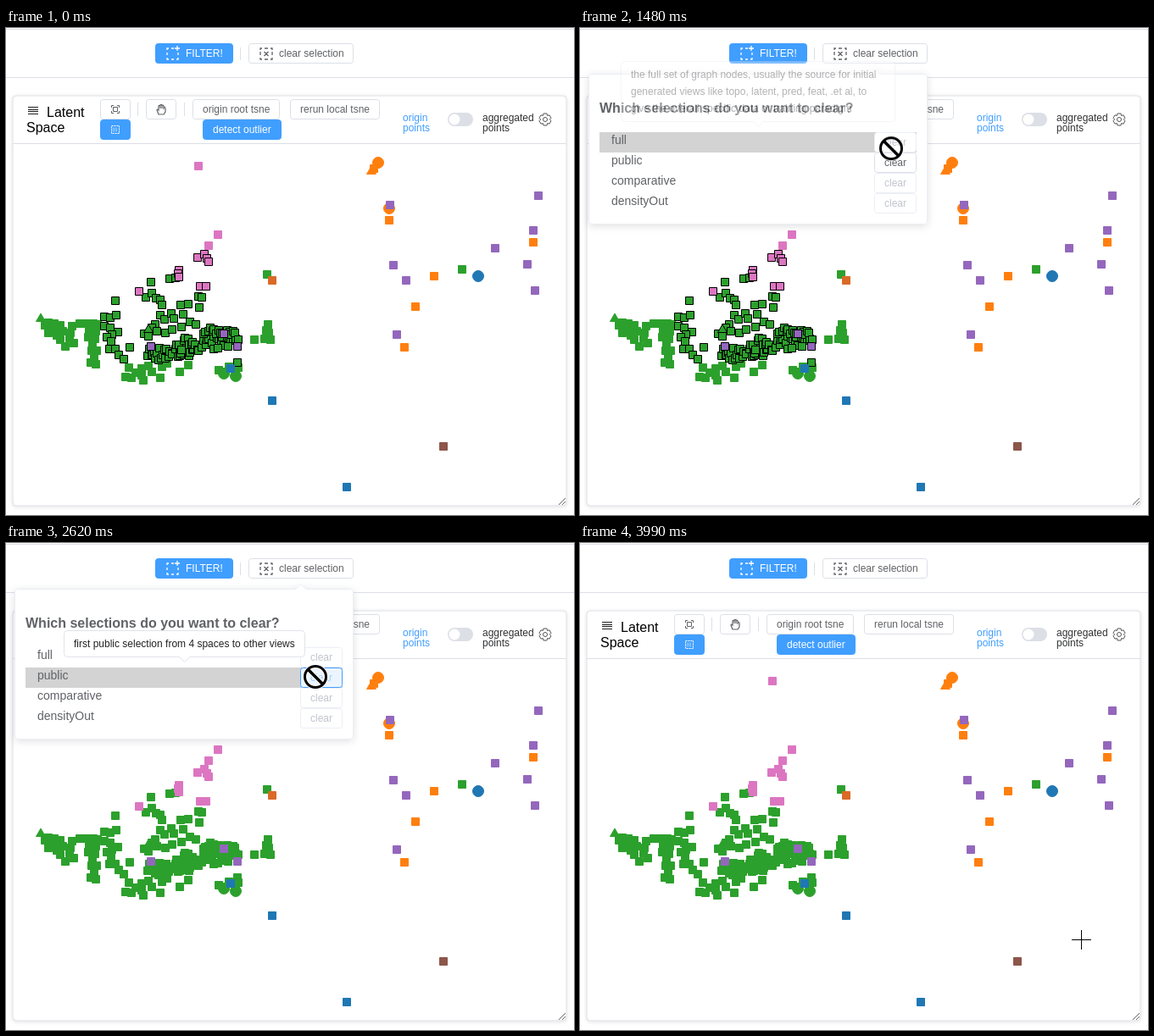
Animation, 670 px wide and 575 px high, one loop 4060 ms. Source, as an HTML page:

```html
<!DOCTYPE html>
<html lang="en">
<head>
<meta charset="utf-8">
<title>Latent space selections</title>
<style>
html, body { margin: 0; width: 100%; height: 100%; overflow: hidden; background: #fff; }
svg { display: block; width: 670px; height: 575px; font: 12px "Liberation Sans", Arial, sans-serif; }
text { fill: currentColor; white-space: pre; }
.line { stroke: #dcdfe6; fill: none; }
.icon { fill: none; stroke: currentColor; }
.btn { color: #606266; }
.btn rect { fill: #fff; stroke: #dcdfe6; }
.primary { color: #fff; }
.primary rect { fill: #409eff; stroke: #409eff; }
.off { color: #c0c4cc; }
.off rect { stroke: #ebeef5; }
.marks * { fill: currentColor; stroke: currentColor; }
.row { fill: #d3d3d3; opacity: 0; }
.tip { color: #222; opacity: 0; }
.tip path { fill: #fff; stroke: #e0e3e9; }

.marks .picked, .step, .row, #clear, #clear rect, #public, #public rect { animation: 4060ms step-end infinite; }
.fade, #mouse { animation: 4060ms linear infinite; }

.marks .picked { animation-name: picked; }
@keyframes picked { 0% { stroke: #000 } 63%, 100% { stroke: currentColor } }

#dialog { animation-name: dialog; }
@keyframes dialog { 0%, 14.3% { opacity: 0 } 19.5%, 84% { opacity: 1 } 89%, 100% { opacity: 0 } }

#clear { animation-name: clearText; }
#clear rect { animation-name: clearBox; }
@keyframes clearText { 0%, 28.3%, 100% { color: #606266 } 14.5% { color: #409eff } }
@keyframes clearBox {
  0%, 28.3%, 100% { fill: #fff; stroke: #dcdfe6 }
  14.5% { fill: #ecf5ff; stroke: #c6e2ff }
}

#public { animation-name: publicText; }
#public rect { animation-name: publicBox; }
@keyframes publicText {
  0% { color: #606266 } 39.2% { color: #409eff } 63% { color: #a0cfff } 67%, 100% { color: #c0c4cc }
}
@keyframes publicBox {
  0% { fill: #fff; stroke: #dcdfe6 }
  39.2% { fill: #ecf5ff; stroke: #c6e2ff }
  63% { fill: #ecf5ff; stroke: #409eff }
  67%, 100% { fill: #fff; stroke: #ebeef5 }
}

#row0 { animation-name: row0; }
#row1 { animation-name: row1; }
#row2 { animation-name: row2; }
#row3 { animation-name: row3; }
@keyframes row0 { 0%, 39.2%, 100% { opacity: 0 } 34.7% { opacity: 1 } }
@keyframes row1 { 0%, 68.8%, 100% { opacity: 0 } 39.2% { opacity: 1 } }
@keyframes row2 { 0%, 71.4%, 100% { opacity: 0 } 68.8% { opacity: 1 } }
@keyframes row3 { 0%, 75.9%, 100% { opacity: 0 } 71.4% { opacity: 1 } }

#tip0 { animation-name: tip0; }
#tip1 { animation-name: tip1; }
#tip2 { animation-name: tip2; }
#tip3 { animation-name: tip3; }
@keyframes tip0 { 0%, 34.9% { opacity: 0 } 39.5%, 41% { opacity: 1 } 46%, 100% { opacity: 0 } }
@keyframes tip1 { 0%, 44.8% { opacity: 0 } 49.8%, 68.5% { opacity: 1 } 73%, 100% { opacity: 0 } }
@keyframes tip2 { 0%, 71.2% { opacity: 0 } 76%, 78.6% { opacity: 1 } 83.3%, 100% { opacity: 0 } }
@keyframes tip3 { 0%, 74% { opacity: 0 } 78.6%, 80% { opacity: 1 } 84.5%, 100% { opacity: 0 } }

#mouse { animation-name: mouse; }
@keyframes mouse {
  0%, 1.72% { transform: translate(616px, 549px); animation-timing-function: ease-in-out }
  13.05% { transform: translate(346px, 43px) }
  14.78%, 27% { transform: translate(347px, 29px) }
  36.45% { transform: translate(367px, 142px) }
  39.9%, 66.3% { transform: translate(365px, 158px) }
  69.5% { transform: translate(368px, 180px) }
  72.7% { transform: translate(388px, 206px) }
  74.4% { transform: translate(418px, 232px) }
  81.28% { transform: translate(456px, 322px) }
  87.93% { transform: translate(554px, 323px) }
  98.28%, 100% { transform: translate(591px, 468px) }
}
#cross { animation-name: cross; }
#hand { animation-name: hand; }
#ban { animation-name: ban; }
#arrow { animation-name: arrow; }
@keyframes cross { 0%, 14% { opacity: 0 } 1.72%, 74.3%, 100% { opacity: 1 } }
@keyframes hand { 0%, 29%, 63%, 100% { opacity: 0 } 14%, 39.2% { opacity: 1 } }
@keyframes ban { 0%, 39.2%, 72.5%, 100% { opacity: 0 } 34.7%, 63% { opacity: 1 } }
@keyframes arrow { 0%, 34.7%, 74.3%, 100% { opacity: 0 } 29%, 72.5% { opacity: 1 } }
</style>
</head>
<body>
<svg viewBox="0 0 670 575">
  <defs>
    <filter id="soft" x="-10%" y="-10%" width="120%" height="125%">
      <feDropShadow dx="0" dy="2" stdDeviation="5" flood-opacity=".12"/>
    </filter>
    <filter id="edge" x="-5%" y="-5%" width="110%" height="110%">
      <feDropShadow dx="0" dy="1" stdDeviation="2" flood-opacity=".12"/>
    </filter>
    <path id="palm" d="M-1 11 -5 7Q-6 4 -3 5L-1 7V1Q1-1 2 1V6Q4 4 5 7Q7 5 8 8Q11 7 11 10V15L8 19V22H0V19Z"/>
  </defs>

  <path class="line" d="M0 1.5H670M0 58.5H670M276.5 23V38"/>
  <g class="btn primary">
    <rect x="176.5" y="18.5" width="91" height="23" rx="3"/>
    <path class="icon" stroke-width="1.3" d="M190 26V24H192M195 24H198M190 29V32M190 35V37H192M195 37H198M201 37H203V35M203 29V32M202 21V27M199 24H205"/>
    <text x="212" y="34">FILTER!</text>
  </g>
  <g class="btn" id="clear">
    <rect x="286.5" y="18.5" width="123" height="23" rx="3"/>
    <path class="icon" stroke-width="1.3" d="M300 26V24H302M305 24H309M312 24H314V26M300 28V32M300 35V37H302M305 37H309M312 37H314V35M314 28V32M304.500 28 309.500 33M309.500 28 304.500 33"/>
    <text x="322" y="34">clear selection</text>
  </g>

  <rect x="8" y="80" width="653" height="484" rx="4" fill="#fff" stroke="#dcdfe6" filter="url(#edge)"/>
  <path class="line" d="M8 136.500H661M155.500 88V104M210.500 88V104"/>
  <path stroke="#222" d="M26 93.500H38M26 96.500H38M26 98.500H38M26 101.500H38"/>
  <g font-size="16"><text x="48" y="105">Latent</text><text x="24" y="123">Space</text></g>
  <g class="btn">
    <rect x="111.5" y="84.5" width="35" height="23" rx="3"/>
    <path class="icon" d="M124.500 94V91.500H127M131 91.500H133.500V94M133.500 98V100.500H131M127 100.500H124.500V98M126.500 93.500H131.500V98.500H126.500Z"/>
    <rect x="165.5" y="84.5" width="35" height="23" rx="3"/>
    <path class="icon" stroke-width="1.2" d="M180 102 178 97Q178 95 180 97V92Q181 91 182 92V95 91Q183 90 184 91V95 91.500Q185 90.500 186 92V96 93.500Q188 93 188 95V99L186 102Z"/>
    <rect x="220.5" y="84.5" width="102" height="23" rx="3"/>
    <text x="232" y="100">origin root tsne</text>
    <rect x="335.5" y="84.5" width="105" height="23" rx="3"/>
    <text x="347" y="100">rerun local tsne</text>
  </g>
  <g class="btn primary">
    <rect x="111.5" y="108.500" width="35" height="23" rx="3"/>
    <path class="icon" stroke-dasharray="2 1" d="M124.500 115.500H133.500V124.500H124.500Z"/>
    <path class="icon" opacity=".5" stroke-dasharray="1 1" stroke-width="5" d="M126 120H132"/>
    <rect x="232.5" y="108.500" width="92" height="23" rx="3"/>
    <text x="244" y="124">detect outlier</text>
  </g>
  <g color="#409eff"><text x="468" y="110">origin</text><text x="468" y="122">points</text></g>
  <rect x="521" y="100" width="30" height="16" rx="8" fill="#dcdfe6"/>
  <circle cx="529" cy="108" r="6.500" fill="#fff"/>
  <g color="#303133"><text x="562" y="110">aggregated</text><text x="562" y="122">points</text></g>
  <g class="icon" color="#555">
    <path d="M634 101H638L638.600 103.500 641 102.800 643 106.300 641.300 108 643 109.700 641 113.200 638.600 112.500 638 115H634L633.400 112.500 631 113.200 629 109.700 630.700 108 629 106.300 631 102.800 633.400 103.500Z"/>
    <circle cx="636" cy="108" r="2.500"/>
  </g>
  <path stroke="#666" d="M652 563 660 555M656 563 660 559"/>
  <g class="marks" id="marks"></g>

  <g class="fade" id="dialog">
    <path d="M14 54.500H342L348 49 354 54.500H406Q409.500 54.500 409.500 58V228Q409.500 231.500 406 231.500H14Q10.500 231.500 10.500 228V58Q10.500 54.500 14 54.500Z" fill="#fff" stroke="#ebeef5" filter="url(#soft)"/>
    <text x="23" y="100" color="#606266" font-size="16" font-weight="bold">Which selections do you want to clear?</text>
    <g id="rows"></g>
  </g>
  <g id="tips"></g>

  <g id="mouse">
    <path class="step" id="cross" stroke="#000" d="M-11 .5H12M.5-11V12"/>
    <use class="step" id="hand" href="#palm" fill="#fff" stroke="#000" stroke-width="1.300"/>
    <g class="step" id="ban" fill="none">
      <path d="M-9-9 9 9" stroke="#fff" stroke-width="6"/>
      <circle r="12.500" stroke="#fff" stroke-width="5"/>
      <circle r="12.500" stroke="#000" stroke-width="3"/>
      <path d="M-9-9 9 9" stroke="#000" stroke-width="3.500"/>
    </g>
    <path class="step" id="arrow" fill="#fff" stroke="#000" d="M0 0V16L4 12.500 6.500 18.500 9 17.500 6.500 11.500H11.500Z"/>
  </g>
</svg>
<script>
const byId = id => document.getElementById(id);
const colors = {
  green: '#2ca02c', pink: '#dc76c1', orange: '#ff7f0e', purple: '#9467bd',
  blue: '#1f77b4', brown: '#8c564b', rust: '#d96a27'
};
const shapes = {
  square: (x, y) => `M${x - 4.5} ${y - 4.5}h9v9h-9Z`,
  circle: (x, y) => `M${x - 6.5} ${y}a6.5 6.5 0 1 0 13 0a6.5 6.5 0 1 0 -13 0Z`,
  triangle: (x, y) => `M${x} ${y - 6}l5.500 9.500h-11Z`
};
let marks = '';

function mark(color, x, y, picked = false, shape = 'square') {
  marks += `<path color="${colors[color]}" class="${picked ? 'picked' : ''}" d="${shapes[shape](x, y)}"/>`;
}
function plot(color, points, picked, shape) {
  for (const p of points.split(' ')) mark(color, ...p.split(',').map(Number), picked, shape);
}

let seed = 11;
const random = () => (seed = (seed * 16807) % 2147483647) / 2147483647;

// Selected points scattered around a line.
function band(count, x1, y1, x2, y2, spread) {
  for (let i = 0; i < count; i++) {
    const t = (i + random()) / count;
    const drift = (random() * 2 - 1) * spread;
    mark('green', Math.round(x1 + (x2 - x1) * t), Math.round(y1 + (y2 - y1) * t + drift), true);
  }
}

// Left edge and lower rim stay outside the selection.
plot('green', '41,343', false, 'triangle');
plot('green', '50,348 46,351 52,354 57,349 64,351 59,357 67,358 50,360 60,363 64,368 70,376 78,352 76,360 75,366 80,372 87,349 95,349 103,349 108,350 98,357 106,358 97,365 105,367 102,374 101,381 107,381 104,389 100,395 106,397');
plot('green', '141,412 145,401 148,413 153,407 160,402 162,416 160,410 172,406 168,399 182,413 184,400 190,396 205,406 215,398 251,404 258,406 263,400 271,405 274,401');
plot('green', '257,408 271,411', false, 'circle');
plot('green', '308,291 309,350 307,357 310,360 312,368 305,367 293,368 538,285');

plot('green', '171,300 193,296 200,295 129,322 165,318 172,313 177,319 182,321 184,327 116,341 123,342 130,339 116,352 123,354 132,359 125,362 119,365 124,370 122,379 129,379 133,386 139,391 146,377', true);
plot('green', '206,327 215,326 227,317 231,318 228,330 182,339 187,344 195,337 209,338 198,343 176,350 172,354 217,347 224,350 163,361 168,364 178,358 188,360 196,356 207,353', true);
plot('green', '168,356', true, 'triangle');
band(32, 167, 388, 222, 379, 9);
band(30, 202, 375, 270, 368, 9);
band(16, 232, 357, 272, 362, 6);
plot('green', '250,378 262,376 270,360 274,368 273,395', true);
plot('purple', '171,376 257,361 273,376', true);
plot('blue', '265,402');

plot('pink', '227,163 250,244 239,257');
plot('pink', '226,271 234,267 237,272 239,276 204,286 203,290 204,294 229,305 236,305 157,311', true);
plot('rust', '314,298');
plot('orange', '439,159 452,213', false, 'circle');
plot('orange', '431,169', false, 'triangle');
plot('orange', '434,166 452,227 622,253 505,293 483,329 470,377');
plot('purple', '453,209 628,198 622,239 577,260 615,279 624,310 457,280 472,298 461,362');
plot('blue', '557,293', false, 'circle');
plot('blue', '314,440 402,542');
plot('brown', '516,494');
byId('marks').innerHTML = marks;

byId('rows').innerHTML = ['full', 'public', 'comparative', 'densityOut'].map((name, i) => {
  const y = 123 + 24 * i;
  const button = name === 'public' ? 'class="btn" id="public"' : 'class="btn off"';
  return `<rect class="row" id="row${i}" x="23" y="${y}" width="374" height="24"/>
    <text x="37" y="${y + 14}" font-size="14" color="#606266">${name}</text>
    <g ${button}><rect x="347.5" y="${y + .5}" width="49" height="23" rx="3"/><text x="359" y="${y + 16}">clear</text></g>`;
}).join('');

function tip(id, x, y, w, h, lines) {
  const mid = x + w / 2;
  const text = lines.map((line, i) => `<text x="${x + 11.5}" y="${y + 19.5 + 20 * i}">${line}</text>`).join('');
  return `<g class="tip fade" id="${id}"><path d="M${x + 4} ${y}h${w - 8}q4 0 4 4v${h - 8}q0 4 -4 4H${mid + 6}l-6 6l-6 -6H${x + 4}q-4 0 -4 -4v${8 - h}q0 -4 4 -4Z"/>${text}</g>`;
}
byId('tips').innerHTML =
  tip('tip0', 48.5, 39.5, 323, 71, [
    'the full set of graph nodes, usually the source for initial',
    'generated views like topo, latent, pred, feat, .et al, to',
    'give the overall specific data or training paradigm'
  ]) +
  tip('tip1', 68.5, 103.5, 284, 31, ['first public selection from 4 spaces to other views']) +
  tip('tip2', 74.5, 127.5, 271, 31, ['selections from 4 spaces to comparative views']) +
  tip('tip3', 83.5, 151.5, 252, 31, ['selections from the topo-latent density view']);
</script>
</body>
</html>
```
